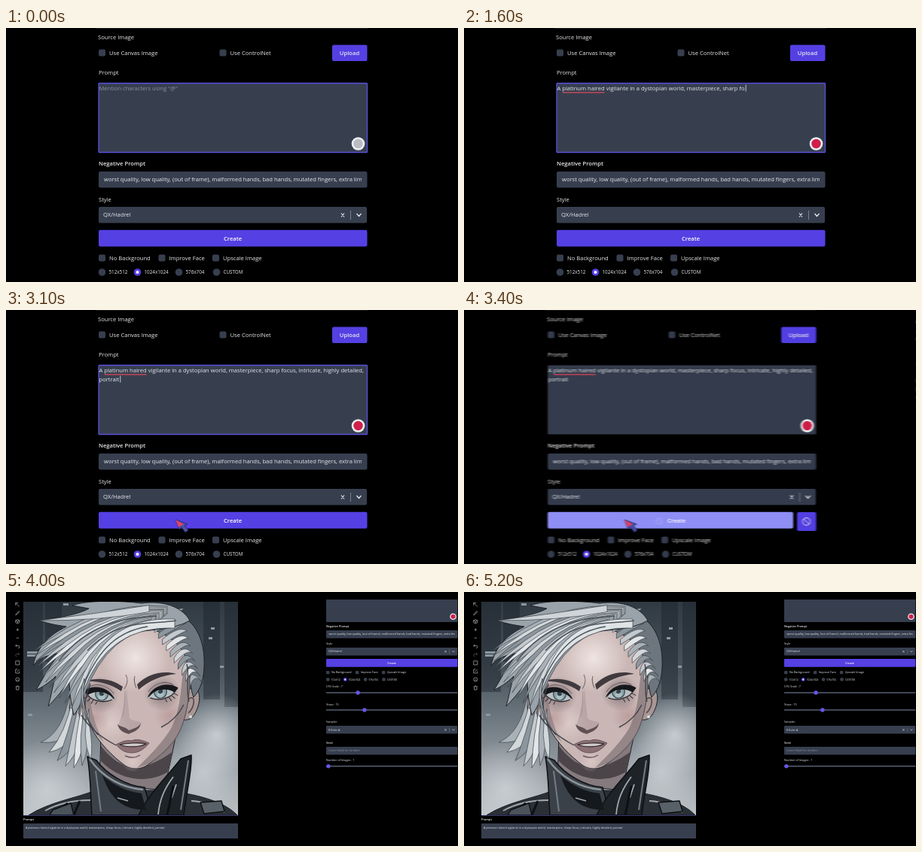
Animation, 600 px wide and 338 px high, one loop 5300 ms. Source, as an HTML page with a canvas:

```html
<!DOCTYPE html>
<html lang="en">
<head>
<meta charset="utf-8">
<title>Prompt to portrait</title>
<style>
  html, body { margin: 0; width: 100%; height: 100%; overflow: hidden; background: #000; }
  canvas { display: block; width: 600px; height: 338px; }
</style>
</head>
<body>
<canvas id="stage" width="600" height="338"></canvas>
<script>
const W = 600, H = 338, LOOP = 5300, STEP = 100;
const FIELD = '#373f4f', ACCENT = '#5540e3', WHITE = '#e6e8ec', MUTED = '#8b919c';
const INK = '#1d2126';
const LINE_1 = 'A platinum haired vigilante in a dystopian world, masterpiece, sharp focus, intricate, highly detailed, ';
const LINE_2 = 'portrait';
const NEGATIVE = 'worst quality, low quality, (out of frame), malformed hands, bad hands, mutated fingers, extra limbs';
const STYLE = 'QX/Hadrel';

const stage = document.getElementById('stage');
const out = stage.getContext('2d');
// Both screens sit side by side on one strip; the transition pans across it.
const strip = document.createElement('canvas');
strip.width = W * 2;
strip.height = H;
const g = strip.getContext('2d');

function text(str, x, y, { size = 7.6, weight = 400, color = WHITE, align = 'left' } = {}) {
  g.font = `${weight} ${size}px "Open Sans", "Noto Sans", sans-serif`;
  g.fillStyle = color;
  g.textAlign = align;
  g.fillText(str, x, y + size * 0.36);
}

function box(x, y, w, h, fill = FIELD, radius = 2, stroke) {
  g.beginPath();
  g.roundRect(x, y, w, h, radius);
  g.fillStyle = fill;
  g.fill();
  if (stroke) { g.strokeStyle = stroke; g.lineWidth = 1.3; g.stroke(); }
}

function disc(x, y, r, fill) {
  g.beginPath();
  g.arc(x, y, r, 0, 7);
  g.fillStyle = fill;
  g.fill();
}

function line(d, color = WHITE, width = 1) {
  g.strokeStyle = color;
  g.lineWidth = width;
  g.stroke(new Path2D(d));
}

function shape(d, fill, stroke, width = 1) {
  g.fillStyle = fill;
  g.fill(new Path2D(d));
  if (stroke) line(d, stroke, width);
}

function clipped(x, y, w, h, draw) {
  g.save();
  g.beginPath();
  g.rect(x, y, w, h);
  g.clip();
  draw();
  g.restore();
}

function check(x, y, label) {
  box(x, y - 4.5, 9, 9);
  text(label, x + 14, y);
}

function select(y, label) {
  box(123, y, 356, 21.5);
  text(label, 129, y + 10.7);
  line(`M445 ${y + 8.5}l4 5m0 -5l-4 5M465.5 ${y + 9}l3 3.5l3 -3.5`, WHITE, 1.2);
  line(`M457.5 ${y + 5}v12`, MUTED, 0.8);
}

function slider(y, knob) {
  line(`M123 ${y}H479`, '#566072', 3);
  disc(knob, y, 5.5, '#6a55e8');
}

function ban(x, y, r, color) {
  line(`M${x - r} ${y}a${r} ${r} 0 1 1 ${2 * r} 0a${r} ${r} 0 1 1 ${-2 * r} 0M${x - r * 0.7} ${y - r * 0.7}l${r * 1.4} ${r * 1.4}`, color, 1);
}

function promptField(typed, focus) {
  const first = LINE_1.slice(0, typed);
  const second = LINE_2.slice(0, Math.max(0, typed - LINE_1.length));
  box(123, 73.5, 356.5, 92, FIELD, 1, focus && '#5a50dc');
  if (!typed) return text('Mention characters using "@"', 123.5, 80, { color: MUTED });
  text(first, 123.5, 80);
  text(second, 123.5, 92);
  if (typed > 20) line('M131 85.8H186.5', '#e0485c', 1.2);
  if (focus) {
    const caretX = 125 + g.measureText(second || first).width;
    const caretY = second ? 87.5 : 75.5;
    line(`M${caretX} ${caretY}v9`, WHITE, 0.8);
  }
}

function panel({ typed = 0, focus = false, busy = false, badge = '#d01f4b', showPrompt = true }) {
  line('M120 0.5H480', '#1b1b20');
  text('Source Image', 122, 12);
  check(123, 33, 'Use Canvas Image');
  check(283.5, 33, 'Use ControlNet');
  box(433, 22.5, 46.5, 21.5, ACCENT);
  text('Upload', 456, 33, { weight: 600, align: 'center' });

  text('Prompt', 123, 59);
  if (showPrompt) promptField(typed, focus);
  else box(123, 73.5, 356.5, 95);
  disc(467.5, 154, 8.8, '#eceef0');
  disc(467.5, 154, 6.2, badge);

  text('Negative Prompt', 123, 180.5, { weight: 600 });
  box(123, 191, 356.5, 21.5);
  clipped(123, 191, 349, 22, () => text(NEGATIVE, 130, 201.5));
  text('Style', 123, 228);
  select(238, STYLE);

  box(123, 268.7, busy ? 326 : 356.5, 22, busy ? '#918ff6' : ACCENT);
  text('Create', busy ? 294 : 301, 279.8, { weight: 600, align: 'center', color: '#fff' });
  if (busy) {
    ban(271, 281, 4, '#aaa6fb');
    box(454, 269, 25.5, 25, ACCENT);
    ban(466.5, 281.5, 5, WHITE);
  }

  check(123, 306, 'No Background');
  check(202.5, 306, 'Improve Face');
  check(274, 306, 'Upscale Image');
  const sizes = [[127.5, '512x512'], [174.5, '1024x1024'], [229.5, '576x704'], [279.5, 'CUSTOM']];
  for (const [x, label] of sizes) {
    const chosen = label === '1024x1024';
    disc(x, 325, 4.8, chosen ? ACCENT : FIELD);
    if (chosen) disc(x, 325, 2, '#fff');
    text(label, x + 9, 325, { size: 6.3, weight: 500 });
  }
}

function pointer(x, y) {
  shape(`M${x} ${y}l5 13 3 -3 5 7 4 -3 -5 -6 4 -2Z`, '#4d50a8', '#222a5c', 0.8);
  shape(`M${x} ${y}l4 10 7 -4Z`, '#e0436b');
}

function glow(x, y, r, color) {
  const fade = g.createRadialGradient(x, y, 0, x, y, r);
  fade.addColorStop(0, color);
  fade.addColorStop(1, color.slice(0, 7) + '00');
  g.fillStyle = fade;
  g.fillRect(x - r, y - r, 2 * r, 2 * r);
}

// A tapered strand of hair from a wide root to a pointed tip.
function lock(x, y, cx, cy, tipX, tipY, width, fill) {
  const h = width / 2;
  shape(`M${x} ${y - h}Q${cx - h} ${cy - h} ${tipX} ${tipY}Q${cx + h} ${cy + h} ${x} ${y + h}Z`, fill, '#3a4249', 0.7);
}

function locks(count, draw) {
  const tones = ['#a9b1b7', '#d2d7da', '#8d969d', '#c3c9cd', '#e3e6e8'];
  for (let i = 0; i < count; i++) draw(i / (count - 1), tones[i % tones.length]);
}

// Drawn for the left side: outer corner at negative x. flip mirrors it.
function eye(x, y, tilt, flip) {
  const almond = 'M-19 0C-10 -10 8 -9 17 5C8 10 -10 9 -19 0Z';
  g.save();
  g.translate(x, y);
  g.rotate(tilt);
  g.scale(flip, 1);
  glow(-2, 0, 25, '#54474e99');
  shape(almond, '#b9c1c5');
  g.save();
  g.clip(new Path2D(almond));
  disc(0, -1, 9, '#3f4f57');
  disc(0, -1, 7.6, '#8ba3a8');
  disc(0, 2, 4.5, '#a9bfc2');
  disc(0, -2, 3.2, '#364148');
  line('M-19 -2C-9 -10 8 -8 17 4', '#4a535a', 4);
  g.restore();
  disc(3, -4, 1.7, '#f3f7f7');
  shape('M-24 -5C-12 -14 9 -12 18 6C8 -5 -9 -7 -19 1Z', '#15171b');
  line('M-19 0C-12 9 4 11 14 6', '#2f2a2f', 1.3);
  line('M-15 5l-4 4M-11 7l-3 5M-6 9l-2 4M-18 2l-5 3', '#2f2a2f', 1);
  line('M-18 -9C-8 -17 8 -13 16 -2', '#6b5d61', 1);
  g.restore();
}

function backdrop() {
  const sky = g.createLinearGradient(0, 13, 0, 297);
  ['#303a42', '#4a555e', '#828b92', '#bbc0c4'].forEach((c, i) => sky.addColorStop(i / 3, c));
  g.fillStyle = sky;
  g.fillRect(23, 13, 285, 284);
  g.fillStyle = '#1c242b77';
  for (const [x, w, h] of [[23, 26, 120], [52, 22, 80], [262, 22, 130], [290, 18, 140]]) g.fillRect(x, 13, w, h);
  g.fillStyle = '#8c979f';
  for (const [x, y, w] of [[28, 79, 15], [28, 83, 13], [76, 15, 7], [29, 162, 6], [272, 47, 5], [269, 60, 5], [284, 98, 5]]) g.fillRect(x, y, w, 3);
  glow(280, 190, 55, '#d6dbdecc');
  glow(262, 240, 60, '#d6dbdeaa');
  glow(55, 262, 65, '#d6dbdeaa');
}

function jacket() {
  shape('M126 190L124 255 210 264 228 180Z', '#857a7e', INK);
  shape('M126 205C150 235 175 246 222 212L214 240C185 256 150 250 126 225Z', '#4b4448');
  shape('M30 297C58 279 95 274 118 264H214C250 269 288 277 307 297Z', '#2b3036', INK);
  shape('M108 219L120 224C134 243 160 258 184 260L194 297H114C112 265 112 240 108 219Z', '#3b4148', '#0d1013', 1.5);
  shape('M246 217C247 240 240 262 236 297H176C188 270 212 248 232 222Z', '#1e2328', '#0d1013', 1.5);
  shape('M128 244C146 260 164 266 180 268L186 290C160 290 140 280 128 244Z', '#15181c');
  line('M111 222C128 247 155 261 182 263', '#8d959b', 2.4);
  line('M119 238l7 54M242 224l-10 66', '#737b82', 2);
  line('M222 246C210 262 204 276 202 296M52 291C70 281 92 277 112 277M246 278C262 279 278 284 290 293M148 274l14 4M226 256l-6 18', '#a2a9af', 1.8);
  line('M62 297L82 281M90 297L98 278M214 297L222 258', '#0d1013', 3);
  shape('M258 280l28 -2 4 14 -27 3Z', '#596168', '#0d1013', 1.4);
  shape('M62 290l24 -9 4 16H58Z', '#4b535a', '#0d1013', 1.4);
}

function face() {
  shape('M240 132C254 120 260 136 255 152C250 167 244 171 236 170Z', '#a99795', INK);
  shape('M100 135C82 126 80 148 88 164C95 177 102 174 108 168Z', '#a99896', INK);
  line('M243 142C253 136 250 154 242 161M90 141C87 148 92 160 99 164', '#51464a', 1.6);
  disc(245, 166, 2, '#d9dfe2');
  disc(92, 171, 1.8, '#d9dfe2');

  shape('M106 92C102 128 102 156 112 178C122 200 142 219 158 231C168 237 180 236 188 230C204 219 222 203 230 186C240 166 250 120 238 78C212 40 150 40 125 62Z', '#cab7b5', INK);
  glow(172, 88, 46, '#f4ebe8dd');
  glow(140, 175, 24, '#e9dad788');
  glow(218, 165, 22, '#a9828277');
  glow(118, 168, 20, '#a9828266');
  glow(168, 226, 14, '#e3d5d288');
  shape('M240 84C230 116 236 146 220 180C208 200 194 214 174 234C200 228 222 206 231 186C242 160 250 112 240 84Z', '#7c6e73aa');
  shape('M106 96C112 142 112 168 130 200C114 186 102 160 103 130Z', '#7c6e7388');
  shape('M160 128C158 146 154 164 149 177L160 184 177 181 180 174C173 171 168 172 164 168Z', '#9f8b8c66');
  shape('M148 176C153 180 158 179 163 184C169 182 174 181 179 175C177 185 168 186 163 189C157 187 150 185 148 176Z', '#5f5055');
  line('M158 132C157 146 157 158 155 166', '#a69292', 1);
  line('M159 110C163 117 161 123 157 129M171 112C169 118 171 123 173 128', '#7c6b6e', 1.1);

  eye(127, 137, 0.02, 1);
  eye(205, 134, -0.06, -1);
  shape('M104 119C122 118 138 122 153 132L155 126C140 115 122 113 104 119Z', '#40393e');
  shape('M176 130C190 118 206 111 226 109C208 104 188 109 174 123Z', '#40393e');

  shape('M146 203C152 200 160 196 167 198C173 195 181 197 190 201C183 210 175 214 167 214C157 214 151 209 146 203Z', '#8b7074', '#4b3d42', 0.7);
  shape('M151 203C160 201 177 200 186 202C177 207 160 207 151 203Z', '#cfcac9', '#2c2328', 1.2);
  line('M158 218C165 221 172 221 178 217', '#6b5b60', 1.5);
}

function hair() {
  // Shaved side, brushed back behind the ear.
  shape('M196 30C236 18 262 48 263 90C264 115 258 130 249 140C243 125 246 105 237 84C230 68 214 56 190 48Z', '#6d767e', INK);
  locks(11, (u, tone) => lock(192 + 52 * u, 42 + 82 * u, 228 + 18 * u, 24 + 78 * u, 236 + 26 * u - 16 * (1 - u) * u, 22 + 100 * u, 7, tone));
  // Loose hair below the left ear.
  locks(7, (u, tone) => lock(84 + 26 * u, 146 + 18 * u, 84 + 24 * u, 196 + 4 * u, 46 + 66 * u, 200 + 34 * Math.sin(u * 2.4), 17, tone));
  // The swept fringe.
  shape('M236 42C205 54 180 48 158 58C134 70 124 94 112 114C104 132 100 152 90 164C86 148 84 130 84 118C72 135 62 146 56 152C60 138 62 125 66 112C56 122 46 128 40 130C50 115 58 95 74 80C62 84 46 84 36 98C42 70 60 56 80 46C66 44 56 42 44 38C70 34 96 30 110 22L88 18C105 11 150 11 180 15C210 11 234 20 244 38Z', '#9aa3aa', INK);
  locks(13, (u, tone) => lock(214 - 24 * u, 24 + 20 * u, 122 - 4 * u, 16 + 42 * u, 38 + 58 * u * u, 78 + 84 * u, 10, tone));
  lock(224, 42, 128, 38, 102, 134, 12, '#dfe3e5');
  lock(190, 22, 120, 34, 44, 38, 9, '#cfd4d8');
  line('M226 38C190 44 150 34 108 78M200 32C160 34 110 40 70 92M188 46C150 52 124 74 104 122', '#4b545b', 1.4);
  line('M112 122C104 142 98 164 122 190M100 164C112 182 124 192 146 204M240 96C244 112 238 128 243 146M236 150C228 166 218 174 206 180', '#3d4349', 1.4);
  lock(104, 118, 94, 150, 120, 188, 6, '#b6bdc3');
}

function portrait() {
  g.lineJoin = 'round';
  backdrop();
  jacket();
  face();
  hair();
}

function toolbar() {
  const icons = [
    'M3 3L-3 -3M-3 1V-3H1', 'M-3 3l1 -2 4 -4 1 1 -4 4Z', 'M-3 -1.5L0 -3 3 -1.5V2L0 3 -3 2ZM-3 -1.5L0 0 3 -1.5M0 0V3',
    'M-2 0H2M0 -2V2', 'M-2 0H2', 'M-1 -3L-3 -1 -1 1M-3 -1H1Q3 -1 3 1T1 3', 'M1 -3L3 -1 1 1M3 -1H-1Q-3 -1 -3 1T-1 3',
    'M-3 -3H3V3H-3Z', 'M0 -3H-3V3H3V0M-1 1L3 -3', 'M-3 0a3 3 0 1 1 6 0a3 3 0 1 1 -6 0M-1.5 1.5Q0 -1 1.5 1.5', 'M-3 -2H3M-2 -2V3H2V-2M-1 -3H1'
  ];
  icons.forEach((d, i) => {
    g.save();
    g.translate(15.3, 17 + i * 11.05);
    g.scale(0.85, 0.85);
    line(d, i === 6 ? '#50545a' : '#a4a8ad', 0.9);
    g.restore();
  });
}

function resultScreen() {
  g.fillStyle = '#000';
  g.fillRect(0, 0, W, H);
  toolbar();
  clipped(23, 13, 285, 284, portrait);
  line('M23 297.5H308', '#4a4690', 0.8);
  text('Prompt', 23, 302.5, { size: 3.9, weight: 600 });
  box(23, 308, 285, 20, FIELD, 1);
  text(LINE_1 + LINE_2, 26, 313.5, { size: 3.7 });

  clipped(420, 10, 180, 300, () => {
    g.translate(364.9, -42.5);
    g.scale(0.489, 0.489);
    panel({ showPrompt: false });
    text('CFG Scale : 7', 123, 344.5);
    slider(361, 209);
    text('Steps : 15', 123, 393);
    slider(408, 227);
    text('Sampler', 123, 439);
    select(451, 'K Euler A');
    text('Seed', 123, 498, { weight: 600 });
    box(123, 508, 356.5, 21.5);
    text('Leave blank for random', 130, 518.5, { color: MUTED });
    text('Number of Images : 1', 123, 545);
    slider(561, 129);
  });
}

function typedCount(t) {
  const keys = [[0, 0], [900, 43], [2400, 104], [2600, 112]];
  for (let i = 1; i < keys.length; i++) {
    const [t0, n0] = keys[i - 1], [t1, n1] = keys[i];
    if (t <= t1) return Math.round(n0 + (n1 - n0) * (t - t0) / (t1 - t0));
  }
  return 112;
}

function formScreen(t) {
  const busy = t >= 3200;
  g.fillStyle = '#000';
  g.fillRect(0, 0, W, H);
  panel({ typed: typedCount(t), focus: !busy, busy, badge: t < 300 ? '#b9bdc3' : '#d01f4b' });
  if (t >= 2800) {
    const left = (1 - Math.min(1, (t - 2800) / 300)) ** 2;
    pointer(225 + 70 * left, 279 - 100 * left);
  }
}

const pan = t => t < 3500 ? 0.5 * Math.exp((t - 3500) / 31) : 1 - 0.5 * Math.exp((3500 - t) / 43);

function render(t) {
  clipped(0, 0, W, H, () => formScreen(t));
  // Averaging a short shutter interval gives the motion blur.
  for (let i = 0; i < 9; i++) {
    out.globalAlpha = 1 / (i + 1);
    out.drawImage(strip, -Math.round(pan(t + i - 4) * W * 10) / 10, 0);
  }
  const speed = Math.abs(pan(t + 1) - pan(t - 1)) * W / 2;
  stage.style.filter = speed > 0.1 ? `blur(${Math.min(0.9, speed)}px)` : 'none';
}

g.save();
g.translate(W, 0);
resultScreen();
g.restore();

const start = performance.now();
function tick() {
  const t = (performance.now() - start) % LOOP;
  render(Math.floor(t / STEP) * STEP);
  requestAnimationFrame(tick);
}
tick();
</script>
</body>
</html>
```
